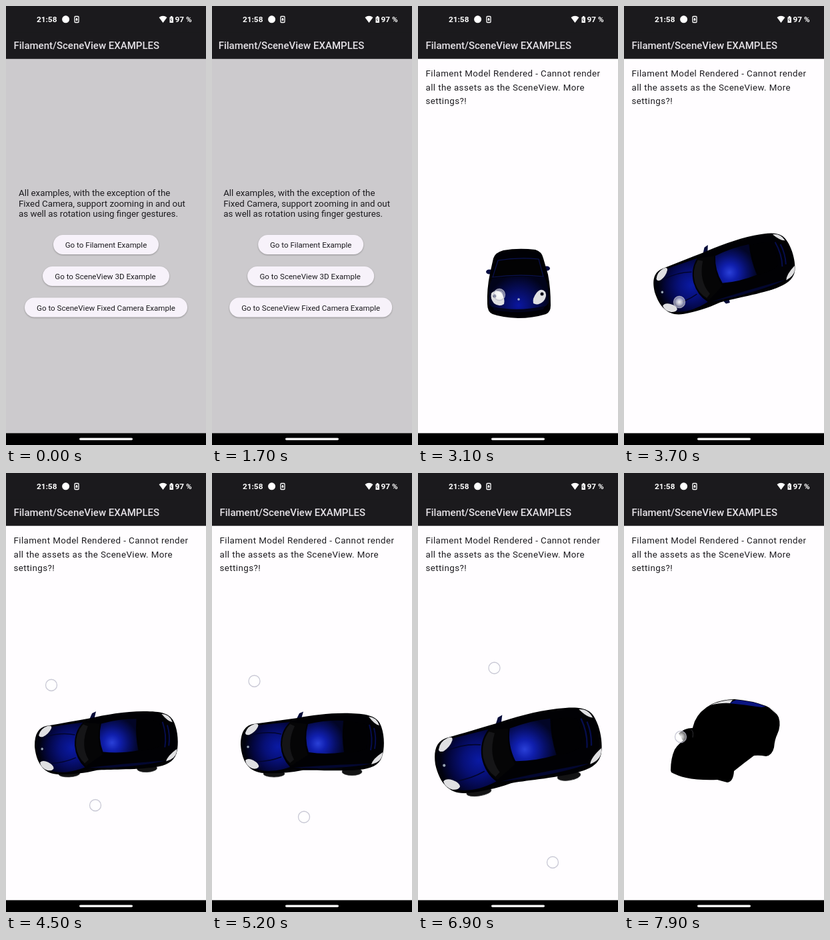
Write an HTML page that moves like this. It is 300 px wide and 654 px high and loops after 8000 ms.

```html
<!DOCTYPE html>
<html lang="en">
<head>
<meta charset="utf-8">
<title>Model viewer demo</title>
<style>
  html, body { margin: 0; width: 100%; height: 100%; overflow: hidden; background: #000; }
  svg { display: block; width: 300px; height: 654px; font-family: Roboto, sans-serif; }
  .title { font-size: 15px; font-weight: 500; fill: #e4e1e6; }
  .body { font-size: 13.33px; fill: #1c1b1f; }
  .wide { letter-spacing: .417px; }
  .label { font-size: 11.6px; text-anchor: middle; fill: #1c1b1f; }
  .pill { fill: #f7f2fa; filter: drop-shadow(0 1px .8px rgba(0, 0, 0, .28)); }
  .status { font-size: 11.8px; font-weight: 700; fill: #fff; }
  .bar { fill: #1b1a1d; }
  .lamp { fill: #e0e0e2; }
</style>
</head>
<body>
<svg viewBox="0 0 300 654">
  <defs>
    <radialGradient id="hood" gradientUnits="userSpaceOnUse" cx="99" cy="408" r="50">
      <stop offset="0" stop-color="#0a1aa4"/><stop offset=".4" stop-color="#071078"/>
      <stop offset=".75" stop-color="#030640"/><stop offset="1" stop-color="#01020e"/>
    </radialGradient>
    <radialGradient id="roof" gradientUnits="userSpaceOnUse" cx="159" cy="403" r="40">
      <stop offset="0" stop-color="#2a40d8"/><stop offset=".3" stop-color="#101fae"/>
      <stop offset=".65" stop-color="#070f68"/><stop offset="1" stop-color="#020526"/>
    </radialGradient>
    <radialGradient id="bonnet" gradientUnits="userSpaceOnUse" cx="151" cy="446" r="46">
      <stop offset="0" stop-color="#0a16a0"/><stop offset=".55" stop-color="#060c58"/><stop offset="1" stop-color="#01031a"/>
    </radialGradient>
    <radialGradient id="glow">
      <stop offset="0" stop-color="#fff" stop-opacity=".95"/><stop offset=".5" stop-color="#fff" stop-opacity=".7"/>
      <stop offset="1" stop-color="#fff" stop-opacity=".35"/>
    </radialGradient>
    <g id="dot"><circle r="8.5" fill="url(#glow)" stroke="#bcbccb" stroke-opacity=".8" stroke-width="1.3"/></g>
  </defs>

  <g id="menu">
    <rect x="-40" y="78.500" width="380" height="560" fill="#cccacd"/>
    <rect class="bar" x="-40" y="39" width="380" height="39.500"/>
    <text class="title" x="11.5" y="64.4">Filament/SceneView EXAMPLES</text>
    <g class="body">
      <text x="19" y="282.7">All examples, with the exception of the</text>
      <text x="19" y="298.5">Fixed Camera, support zooming in and out</text>
      <text x="19" y="314.4">as well as rotation using finger gestures.</text>
    </g>
    <rect class="pill" x="71" y="341" width="158" height="29" rx="14.5"/>
    <rect class="pill" x="55" y="388" width="190" height="29" rx="14.5"/>
    <rect class="pill" x="28" y="434.5" width="244" height="29" rx="14.5"/>
    <text class="label" x="150" y="359.6">Go to Filament Example</text>
    <text class="label" x="149" y="406.6">Go to SceneView 3D Example</text>
    <text class="label" x="150" y="453.6">Go to SceneView Fixed Camera Example</text>
  </g>

  <g id="viewer">
    <rect x="-40" y="78.500" width="380" height="560" fill="#fffdff"/>
    <rect class="bar" x="-40" y="39" width="380" height="39.500"/>
    <text class="title" x="11.5" y="64.4">Filament/SceneView EXAMPLES</text>
    <g class="body wide">
      <text x="11.5" y="105.4">Filament Model Rendered - Cannot render</text>
      <text x="11.5" y="125.7">all the assets as the SceneView. More</text>
      <text x="11.5" y="146">settings?!</text>
    </g>

    <g id="front"><g transform="translate(-151 -414)">
      <ellipse cx="107" cy="396" rx="5" ry="3.5" fill="#050b40"/>
      <ellipse cx="193" cy="391" rx="5" ry="3.5" fill="#050b40"/>
      <path d="M113 376Q116 367 128 364Q150 360 176 363Q186 366 188 376L195 400Q199 420 199 446Q199 456 192 459Q172 465 150 465Q126 464 112 459Q104 456 104 444Q103 422 108 398Z" fill="#000005"/>
      <path d="M111 406Q150 400 190 404Q197 420 196 442Q190 454 150 456Q112 455 106 443Q105 420 111 406Z" fill="url(#bonnet)"/>
      <path d="M120 379Q150 374 181 377L188 403Q150 399 112 404Z" fill="#020203" stroke="#0a1250" stroke-width="1.2"/>
      <path d="M112 448Q150 456 190 447L188 452Q150 460 114 453Z" fill="#02031a"/>
      <path class="lamp" d="M110 428Q117 421 125 427Q131 436 129 444Q122 449 114 443Q108 436 110 428Z"/>
      <path class="lamp" d="M191 426Q185 419 178 427Q171 436 173 443Q180 447 188 440Q194 433 191 426Z"/>
      <circle cx="115" cy="432" r="2.5" fill="#111a48"/><circle cx="186" cy="429" r="2.5" fill="#08081a"/>
      <circle cx="151" cy="437" r="1.8" fill="#aab0c8"/>
    </g></g>

    <g id="top"><g transform="translate(-150 -405)">
      <g id="wheels" fill="#131314" stroke="#3a3a3c" stroke-width=".7">
        <ellipse cx="93" cy="448" rx="16" ry="5"/><ellipse cx="210" cy="445" rx="15" ry="5.5"/>
      </g>
      <path id="mirror" d="M138 439L149 442 149 447 143 447Z" fill="#040a38"/>
      <path d="M127 366L131 358 137 355.500 134 366Z" fill="#040a38"/>
      <path d="M43 405C43 387 49 376 62 374C85 371 105 368 128 365C150 361 180 357 208 358C234 359 249 362 254 378C259 392 259 410 255 423C250 436 238 440 222 442C190 445 150 442 135 443C115 447 95 448 78 447C57 446 45 432 43 405Z" fill="#010104"/>
      <path d="M45 405C46 387 52 378 66 376C82 374 100 373 117 371Q103 384 103 405Q104 425 117 438C100 444 85 445 74 443C55 440 46 425 45 405Z" fill="url(#hood)"/>
      <path d="M60 390Q84 384 104 389M66 430Q86 430 104 423" fill="none" stroke="#02052c" stroke-width="1.5"/>
      <path d="M118 371Q104 384 104 405Q105 424 119 436L144 420Q136 402 142 374Z" fill="#050506"/>
      <path d="M117 374Q105 386 105 405Q106 422 117 432L123 427Q111 405 124 377Z" fill="#151517"/>
      <path d="M144 374Q170 368 197 369Q194 393 198 416Q170 420 145 416Q138 395 144 374Z" fill="url(#roof)"/>
      <path d="M199 371Q215 369 231 374Q235 393 231 411Q215 418 200 416Q196 393 199 371Z" fill="#010103"/>
      <path d="M122 439Q170 435 238 433Q210 439 160 440Z" fill="#030730"/>
      <path d="M236 375Q242 395 238 413M243 380Q247 395 244 411" fill="none" stroke="#060d4c" stroke-width="2"/>
      <path class="lamp" d="M50 387Q53 377 64 374Q71 373 69 378Q65 386 56 390Q50 391 50 387Z"/>
      <path class="lamp" d="M50 428Q54 424 62 428Q71 433 70 438Q67 442 60 440Q51 436 50 428Z"/>
      <path class="lamp" d="M235 363Q247 364 251 376Q244 375 235 363ZM256 416Q256 430 239 434Q241 426 256 416Z"/>
      <circle cx="54" cy="408" r="1.8" fill="#98a6b4"/>
    </g></g>

    <g id="side"><g transform="translate(-152 -399)">
      <path d="M70 443Q70 425 76 412Q82 402 97 393Q103 382 106 370Q113 354 132 344Q148 337 166 337Q192 339 213 347Q227 353 232 364Q236 376 230 389Q226 397 225 409Q222 421 213 422Q203 420 195 421Q180 432 165 444Q164 460 155 461Q147 459 140 457Q112 458 93 454Q80 451 71 446Z"/>
      <path d="M82 388Q92 379 104 380L105 396 88 398Z"/>
      <path d="M100 382Q105 384 103 394" fill="none" stroke="#303034"/>
      <path d="M158 343L168 338Q194 340 213 348L206 349Q180 345 158 343Z" fill="#0a1580"/>
      <path class="lamp" d="M129 346Q147 338 163 338L159 343Q145 342 129 346ZM217 349Q227 353 231 361Q224 355 217 349Z"/>
    </g></g>
  </g>

  <use id="one" href="#dot"/><use id="two" href="#dot"/>

  <rect class="bar" width="300" height="39.5"/>
  <rect y="636.4" width="300" height="18"/>
  <rect x="110" y="643.5" width="80" height="3.2" rx="1.6" fill="#fff"/>
  <text class="status" x="46" y="24">21:58</text>
  <text class="status" x="253.500" y="24">97 %</text>
  <g fill="#fff">
    <circle cx="89.6" cy="19.8" r="5.5"/>
    <path d="M229.500 17Q235.500 12.500 241.500 17L235.500 25Z"/>
    <path d="M245.500 16.500H247V15H249.500V16.500H251V25H245.500Z"/>
    <rect x="103" y="15.5" width="6" height="9" rx="1" fill="none" stroke="#fff" stroke-width="1.3"/>
    <path d="M105 18h2v2h1l-2 2.500-2-2.500h1z"/>
    <path d="M248 18L247 21H248.500L248 23" fill="none" stroke="#1b1a1d" stroke-width=".7"/>
  </g>
</svg>
<script>
const LOOP = 8000, STEP = 100;
const el = id => document.getElementById(id);
const clamp = v => Math.max(0, Math.min(1, v));

// Linear keyframes: rows of [time, ...values].
function track(t, rows) {
  let i = 0;
  while (i < rows.length - 2 && t > rows[i + 1][0]) i++;
  const [a, b] = [rows[i], rows[i + 1]];
  const k = clamp((t - a[0]) / (b[0] - a[0]));
  return a.slice(1).map((v, j) => v + (b[j + 1] - v) * k);
}

function place(id, opacity, transform) {
  el(id).setAttribute("opacity", opacity);
  el(id).setAttribute("transform", transform);
}

// Fast start, very slow end.
function slide(u) {
  return u < 1 / 6 ? .4 * (6 * clamp(u)) ** 3 : 1 - .6 * Math.exp((1 / 6 - u) / .08);
}

const fadeOut = k => Math.min(1, 2 - 2 * k);
const fadeIn = k => Math.min(1, 2 * k);

// Rows: time, projected height, centre y.
const lift = [[2300, 72, 417], [2600, 74, 417], [3100, 104, 414], [3400, 216, 400]];
// Rows: time, centre y, angle, zoom.
const spin = [[3400, 400, -90, 1], [3500, 400, -75, 1], [3600, 400, -42, 1], [3700, 401, -13.5, 1],
  [4300, 404, -3, 1], [5200, 405, 0, 1], [6100, 412, -5, 1.16], [6900, 415.5, -8.5, 1.172]];
// Fingers: time, x, y.
const tap = [[800, 99.5, 358.5], [1100, 99.5, 358.5]];
const drag = [[2700, 128, 385], [3100, 122, 430], [3400, 118, 470], [3700, 83, 441], [4300, 70, 428]];
const pinchA = [[4500, 68, 316], [5200, 63.5, 310], [6100, 82, 277], [6900, 114.5, 290.5], [7100, 118, 287]];
const pinchB = [[4500, 134, 495], [5200, 138, 512.5], [6100, 166, 547], [6900, 202, 580], [7100, 203, 576]];
const tilt = [[7300, 138, 465], [7900, 85, 393], [LOOP, 85, 393]];

function drawCar(t) {
  const [height, midY] = track(t, lift);
  const [y, angle, zoom] = track(t, spin);
  const rise = clamp((height - 110) / 80);
  const turn = clamp((t - 7200) / 700);
  const drop = clamp((turn - .3) / .4);
  const lean = clamp((t - 3700) / 1000);
  const shown = t >= 2300;

  place("front", shown ? fadeOut(rise) : 0, `translate(151 ${midY}) scale(1 ${height / 104})`);
  const cy = t < 3400 ? midY : y - 15 * turn;
  const sx = zoom * (1 - .35 * turn) * (height / 216), sy = zoom * (1 - .25 * turn);
  place("top", shown ? Math.min(fadeIn(rise), fadeOut(drop)) : 0,
    `translate(150 ${cy}) rotate(${angle}) scale(${sx} ${sy})`);
  place("wheels", 1, `translate(0 ${-8 * (1 - lean)})`);
  place("mirror", 1, `translate(0 ${-6 * lean})`);
  place("side", fadeIn(drop), `translate(152 399) scale(${1.35 - .35 * turn})`);
}

function drawTouch(id, t, paths) {
  const path = paths.find(p => t >= p[0][0] && t < p[p.length - 1][0]);
  place(id, path ? 1 : 0, path ? `translate(${track(t, path)})` : "");
}

function draw(now) {
  const t = Math.floor(now % LOOP / STEP) * STEP;
  const shift = 30 * slide((t - 1660) / 450);
  place("menu", 1, `translate(${-shift})`);
  place("viewer", clamp((t - 1710) / 83), `translate(${t < 2400 ? 30 - shift : 0})`);
  drawCar(t);
  drawTouch("one", t, [tap, drag, pinchA, tilt]);
  drawTouch("two", t, [pinchB]);
}

const start = performance.now();
(function loop() {
  draw(performance.now() - start);
  requestAnimationFrame(loop);
})();
</script>
</body>
</html>
```
